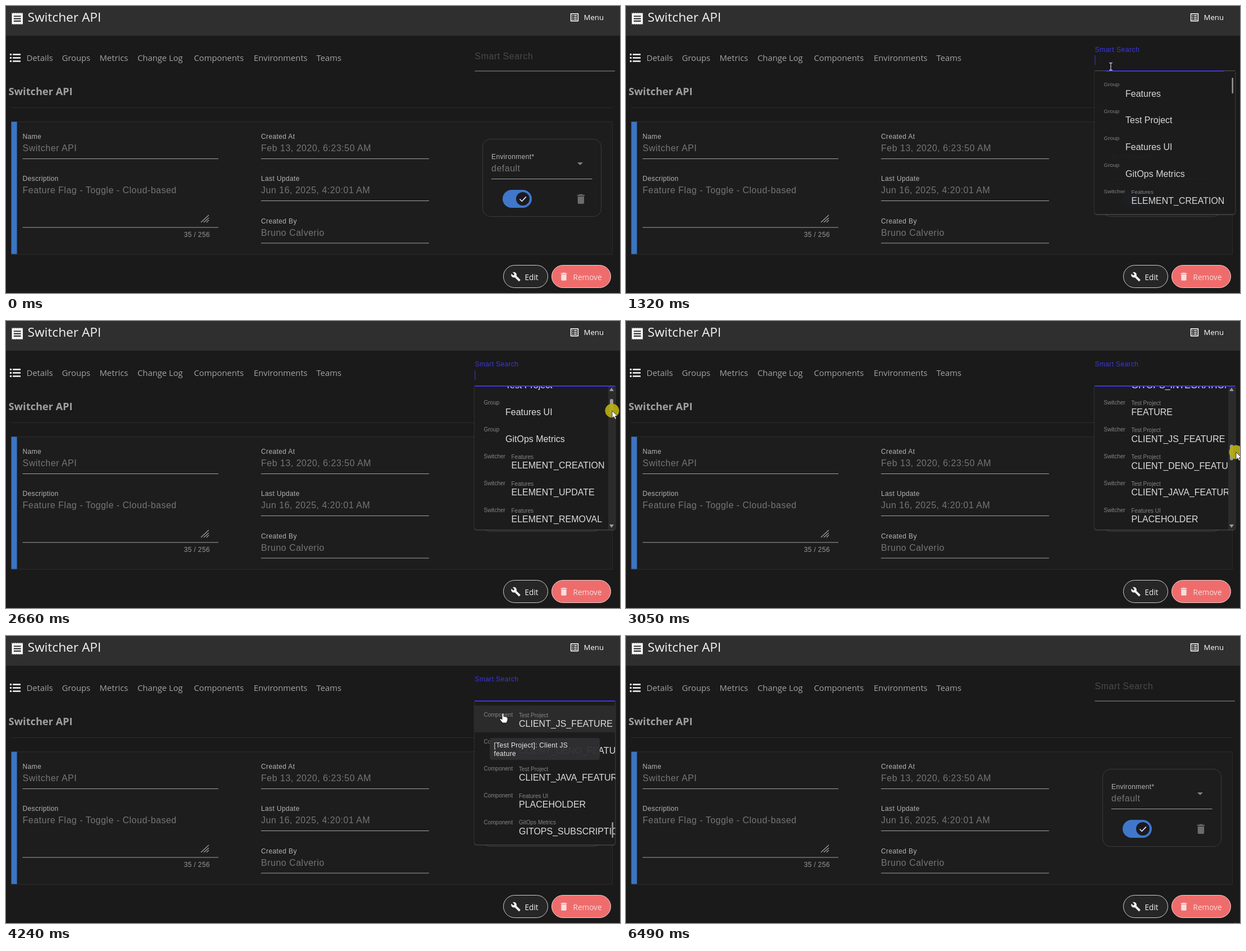
An HTML page for the animation above (6760 ms loop, 1093 px wide and 512 px high).

```html
<!DOCTYPE html>
<html lang="en">
<head>
<meta charset="utf-8">
<title>Smart search</title>
<style>
  html, body { margin: 0; width: 100%; height: 100%; overflow: hidden; background: #1a1a1a; }
  svg { display: block; width: 1093px; height: 512px; }
  text { font-family: "Liberation Sans", Arial, sans-serif; white-space: pre; }
  .ui { font-family: "Open Sans", "Noto Sans", sans-serif; }
  .label { font-size: 12px; letter-spacing: .375px; fill: #b4b4b4; }
  .value { font-size: 16px; letter-spacing: .5px; fill: #757575; }
  .kind { font-size: 10px; fill: #858585; }
  .option { font-size: 16px; fill: #dedede; }
  .tip { font-size: 12px; letter-spacing: .3px; fill: #ececec; }
</style>
</head>
<body>
<svg id="stage" viewBox="0 0 1093 512" xmlns="http://www.w3.org/2000/svg"></svg>
<script>
const LOOP = 6760, TICK = 132.4;
const ROW = 47.9, TOP = 116, HEIGHT = 256;
const ACCENT = '#3d36e2';

const ICON = {
  receipt: 'M18 17H6v-2h12v2zm0-4H6v-2h12v2zm0-4H6V7h12v2zM3 22l1.5-1.5L6 22l1.5-1.5L9 22l1.5-1.5L12 22l1.5-1.5L15 22l1.5-1.5L18 22l1.5-1.5L21 22V2l-1.5 1.5L18 2l-1.5 1.5L15 2l-1.5 1.5L12 2l-1.5 1.5L9 2 7.5 3.5 6 2 4.5 3.5 3 2v20z',
  list: 'M19 5v14H5V5h14m1.1-2H3.9c-.5 0-.9.4-.9.9v16.2c0 .4.4.9.9.9h16.2c.4 0 .9-.5.9-.9V3.9c0-.5-.5-.9-.9-.9zM11 7h6v2h-6V7zm0 4h6v2h-6v-2zm0 4h6v2h-6zM7 7h2v2H7zm0 4h2v2H7zm0 4h2v2H7z',
  wrench: 'M22.7 19l-9.1-9.1c.9-2.3.4-5-1.5-6.9-2-2-5-2.4-7.4-1.3L9 6 6 9 1.6 4.7C.4 7.1.9 10.1 2.9 12.1c1.9 1.9 4.6 2.4 6.9 1.5l9.1 9.1c.4.4 1 .4 1.4 0l2.3-2.3c.5-.4.5-1.1.1-1.4z',
  bin: 'M6 19c0 1.1.9 2 2 2h8c1.1 0 2-.9 2-2V7H6v12zM19 4h-3.5l-1-1h-5l-1 1H5v2h14V4z'
};

const text = (x, y, s, cls, extra = '') => `<text x="${x}" y="${y}" class="${cls}" ${extra}>${s}</text>`;
const rect = (x, y, w, h, fill, extra = '') => `<rect x="${x}" y="${y}" width="${w}" height="${h}" fill="${fill}" ${extra}/>`;
const path = (d, extra = '') => `<path d="${d}" ${extra}/>`;
const icon = (name, x, y, scale, fill) => path(ICON[name], `transform="translate(${x} ${y}) scale(${scale})" fill="${fill}"`);
const field = (x, y, width, label, value, line = y + 35) =>
  text(x, y, label, 'label') + text(x, y + 21.5, value, 'value') + rect(x, line, width, 1, '#a2a2a2');

// Option list: groups first, then the same keys as switchers and as components.
const groups = ['Features', 'Test Project', 'Features UI', 'GitOps Metrics'];
const keys = [
  ...['ELEMENT_CREATION', 'ELEMENT_UPDATE', 'ELEMENT_REMOVAL', 'ACCOUNT_CREATION', 'ACCOUNT_IN_NOTIFY',
    'ACCOUNT_OUT_NOTIFY', 'RATE_LIMIT', 'METRICS_HISTORY', 'CHANGE_HISTORY', 'RELAY_ACCESS',
    'HTTPS_AGENT', 'GITOPS_INTEGRATION'].map(k => [k, 0]),
  ...['FEATURE', 'CLIENT_JS_FEATURE', 'CLIENT_DENO_FEATURE', 'CLIENT_JAVA_FEATURE'].map(k => [k, 1]),
  ['PLACEHOLDER', 2], ['GITOPS_SUBSCRIPTION', 3]
];
const options = [
  ...groups.map(name => ({ kind: 'Group', name, x: 889 })),
  ...[['Switcher', 899.5], ['Component', 913]].flatMap(([kind, x]) =>
    keys.map(([name, g]) => ({ kind, name, x, parent: groups[g] })))
];
const MAX_SCROLL = options.length * ROW + 16 - HEIGHT;
const optionRow = (o, i) => {
  const y = TOP + 8 + i * ROW;
  return text(850.5, y + 19.5, o.kind, 'kind') +
    (o.parent ? text(o.x, y + 20.3, o.parent, 'kind') : '') + text(o.x, y + 37.8, o.name, 'option');
};

const header = rect(0, 0, 1093, 53, '#2f2f2f') + icon('receipt', 7.2, 9.6, 1.08, '#fff') +
  text(38.5, 28, 'Switcher API', 'ui', 'font-size="22.7" fill="#f4f4f4"') +
  icon('list', 1002.4, 10.6, .8, '#fff') +
  text(1028.5, 25.3, 'Menu', 'ui', 'font-size="13.2" font-weight="500" fill="#fff"');

const nav = [86.5, 92.5, 98.5].map(y =>
    `<circle cx="8.4" cy="${y}" r="1.7" fill="#fff"/>` + rect(12, y - 1.2, 14, 2.4, '#fff')).join('') +
  [['Details', 36.5], ['Groups', 99.5], ['Metrics', 166.5], ['Change Log', 234], ['Components', 334.5],
    ['Environments', 441], ['Teams', 552.5]]
    .map(([s, x]) => text(x, 98, s, 'ui', 'font-size="14.8" fill="#a3a3a3"')).join('') +
  text(4.5, 158.5, 'Switcher API', 'ui', 'font-size="18.2" font-weight="700" fill="#a0a0a0"') +
  rect(9, 181, 1071, 1, '#2b2b2b');

const card = rect(9.5, 206.5, 1070, 236.5, '#1d1d1d', 'stroke="#2c2c2c"') + rect(9.5, 206.5, 10, 236, '#3b75c2') +
  field(29.5, 237, 348.5, 'Name', 'Switcher API') +
  field(29.5, 312, 348.5, 'Description', 'Feature Flag - Toggle - Cloud-based', 394.5) +
  path('M347 386L361 373M352 386L361 378M357 386L361 382', 'stroke="#a0a0a0" stroke-width="1.2"') +
  text(363, 411.5, '35 / 256', 'label', 'text-anchor="end" style="fill:#989898"') +
  field(454, 237, 299, 'Created At', 'Feb 13, 2020, 6:23:50 AM') +
  field(454, 312, 299, 'Last Update', 'Jun 16, 2025, 4:20:01 AM') +
  field(454, 388, 299, 'Created By', 'Bruno Calverio', 422.5);

const environment = rect(848.5, 237.5, 211, 138, 'none', 'rx="14" stroke="#3b3b3b"') +
  field(864, 273, 179.5, 'Environment*', 'default') +
  path('M1017 279h10l-5 5z', 'fill="#808080"') +
  rect(884, 328, 52, 32, '#4077cb', 'rx="16"') + '<circle cx="920" cy="344" r="12" fill="#1b1b1f"/>' +
  path('M914.5 344.5l3.8 3.8 7.5-8', 'fill="none" stroke="#e4e4ff" stroke-width="1.7"') +
  icon('bin', 1012, 333, .95, '#6c6c6c');

const buttons = rect(885.5, 462.5, 79, 40, '#262626', 'rx="20" stroke="#d0d0d0"') +
  icon('wrench', 898.5, 474, .75, '#f2f2f2') +
  text(923.5, 489, 'Edit', 'ui', 'font-size="13.6" fill="#f0f0f0"') +
  rect(971.5, 462.5, 105, 40, '#ef6c6c', 'rx="20" stroke="#efd5d5"') +
  icon('bin', 983.6, 473.4, .78, '#f7dede') +
  text(1009.5, 489, 'Remove', 'ui', 'font-size="13.6" fill="#f8dcdc"');

const search = rect(834.5, 115.5, 249.5, 1, '#929292') +
  '<text id="hint" style="font-size:16px;letter-spacing:.5px">Smart Search</text>' +
  rect(834.5, 88, 1, 17, ACCENT, 'id="caret"');

const panel = `<g id="panel">
  ${path(`M834 ${TOP}h250.5v252q0 4-4 4h-242.5q-4 0-4-4z`, 'fill="#1c1c1c" filter="url(#shadow)"')}
  ${rect(834, 124, 250.5, ROW, '#2b2b2b', 'id="hover"')}
  <g clip-path="url(#view)"><g id="rows">${options.map(optionRow).join('')}</g></g>
  <g id="track">${rect(1072, TOP, 12.5, HEIGHT, '#2b2b2b')}
    ${path('M1074 125h8l-4-6zM1074 363h8l-4 6z', 'fill="#9b9b9b"')}</g>
  <rect id="thumb" height="28" fill="#9a9a9a"/>
  <g id="tooltip">${rect(861, 182, 196, 39, '#303032', 'rx="4" opacity=".95"')}
    <text class="tip" id="tip1" x="868.5" y="198.5"/><text class="tip" id="tip2" x="868.5" y="214"/></g>
</g>`;

const cursors = `<circle id="press" r="12.5" fill="#b5ae12" opacity=".92"/>
  <g id="arrow">${path('M0 0v13.2l3-2.7 2.2 4.8 2.3-1-2.1-4.6h4.2z', 'fill="#fff" stroke="#111" stroke-width=".8"')}</g>
  <g id="beam">${path('M-3 -6.5h2l1 1 1-1h2M-3 6.5h2l1-1 1 1h2M0 -5.5v11', 'fill="none" stroke="#e8e8e8" stroke-width="1.1"')}</g>
  <g id="hand">${path('M-2 -6.5q1.5 -1.5 3 0v5l5 1q2 .5 2 2.5v3l-2 5h-7l-5-6q0-2 2-1.5l2 1.5z', 'fill="#fff" stroke="#111" stroke-width=".8"')}</g>`;

const stage = document.getElementById('stage');
stage.innerHTML = `<defs>
  <clipPath id="view"><rect id="viewBox" x="834" y="${TOP}" height="${HEIGHT}"/></clipPath>
  <filter id="shadow" x="-10%" y="-10%" width="120%" height="120%">
    <feDropShadow dx="0" dy="1" stdDeviation="1" flood-color="#808080" flood-opacity=".55"/></filter>
</defs>` + rect(0, 0, 1093, 512, '#1a1a1a') + header + nav + card + environment + buttons + search + panel +
  rect(0, 115, 0, 2, ACCENT, 'id="focus"') + cursors;

const el = {};
stage.querySelectorAll('[id]').forEach(node => el[node.id] = node);
const set = (node, attrs) => { for (const k in attrs) node.setAttribute(k, attrs[k]); };
const show = (node, on) => set(node, { visibility: on ? 'visible' : 'hidden' });

// Linear interpolation through [tick, value, ...] points.
function track(points, n, column = 1) {
  const next = points.findIndex(p => p[0] > n);
  if (next === 0) return points[0][column];
  if (next < 0) return points[points.length - 1][column];
  const a = points[next - 1], b = points[next];
  return a[column] + (b[column] - a[column]) * (n - a[0]) / (b[0] - a[0]);
}

const pointer = [
  [4, 1045, 325], [5, 940, 205], [6, 863, 108], [10, 863, 108], [14, 1048, 140], [16, 1072, 143],
  [17, 1076, 146], [19, 1076, 148], [20, 1079, 160], [23, 1086, 234], [27, 1091, 332], [28, 1091, 350],
  [29, 1088, 310], [31, 970, 165], [32, 885, 145], [36, 885, 145], [37, 860, 130], [39, 829, 94.5],
  [40, 829, 94.5], [41, 875, 128], [43, 1040, 143], [44, 1075, 146], [46, 1086, 290], [49, 1084, 510]
];
const scrolling = [[19, 0], [20, 90], [23, 760.5], [27, 1536.5], [28, MAX_SCROLL]];
const floating = [[7, 0], [8, .5], [9, .78], [10, .93], [11, 1], [44, 1], [45, .4], [46, 0]];
const underline = [[7, 0], [8, 84], [10, 105], [11, 125], [44, 125], [45, 60], [46, 0]];
const opening = [[8, 0], [9, .5], [10, .97], [11, 1], [44, 1], [45, .4], [46, 0]];
const tips = [[13, 0], [15, 1], [16, .96], [17, 0], [31, 0], [32, 1], [36, 1], [37, .5], [38, 0]];

function render(time) {
  const n = Math.floor((time + 12) / TICK);
  const x = track(pointer, n, 1), y = track(pointer, n, 2);

  const up = track(floating, n), half = track(underline, n);
  set(el.hint, { transform: `translate(834.5 ${95 - 14.5 * up}) scale(${1 - .25 * up})`, fill: up ? ACCENT : '#4a4a4d' });
  set(el.focus, { x: 959.3 - half, width: 2 * half });
  show(el.caret, n >= 9 && n < 44 && Math.floor((time - 1185) / 530) % 2 === 0);

  const open = track(opening, n);
  show(el.panel, open > 0);
  set(el.panel, { opacity: open, transform: `translate(0 ${TOP}) scale(1 ${.9 + .1 * open}) translate(0 ${-TOP})` });

  const scroll = track(scrolling, n), wide = n >= 17 && n < 30;
  set(el.rows, { transform: `translate(0 ${-scroll})` });
  set(el.viewBox, { width: wide ? 238 : 250.5 });
  set(el.track, { opacity: wide ? 1 : 0 });
  set(el.thumb, { x: wide ? 1075 : 1078.5, width: wide ? 6 : 2.5, rx: wide ? 3 : 1, y: 128 + 204 * scroll / MAX_SCROLL });
  set(el.hover, { opacity: (n >= 13 && n < 17) || n >= 31 ? 1 : 0 });
  set(el.tooltip, { opacity: track(tips, n) });
  const early = n < 20;
  el.tip1.textContent = early ? '[Features]: Control Switcher' : '[Test Project]: Client JS';
  el.tip2.textContent = early ? 'API features' : 'feature';

  const visible = n >= 4, overInput = n >= 6 && n < 12;
  const overRow = (n >= 13 && n < 17) || (n >= 31 && n < 38) || (n >= 41 && n < 45);
  const shape = overInput ? 'beam' : overRow ? 'hand' : 'arrow';
  for (const name of ['arrow', 'beam', 'hand']) {
    show(el[name], visible && name === shape);
    set(el[name], { transform: `translate(${x} ${y})` });
  }
  show(el.press, n >= 19 && n < 29);
  set(el.press, { cx: x, cy: y });
}

const start = performance.now();
function frame() {
  render((performance.now() - start) % LOOP);
  requestAnimationFrame(frame);
}
render(0);
requestAnimationFrame(frame);
</script>
</body>
</html>
```
